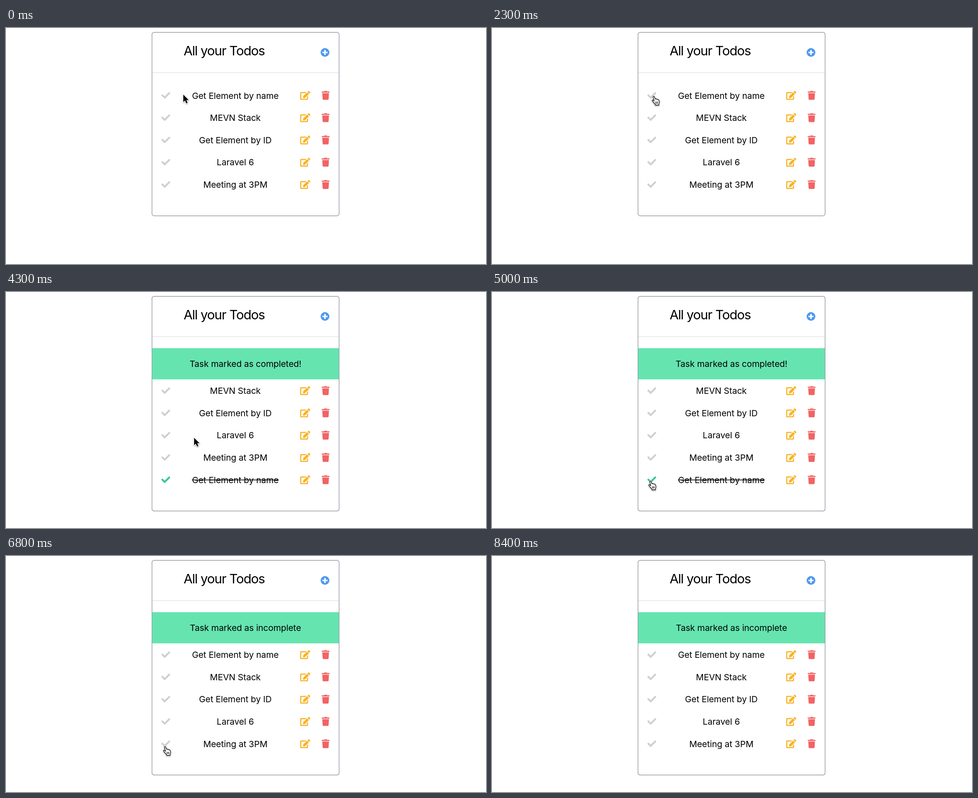
An HTML page with a canvas that plays this animation: 1064x526 px, repeating every 8.9 s.

```html
<!DOCTYPE html>
<html lang="en">
<head>
<meta charset="utf-8">
<title>Todo list</title>
<style>
html, body { margin: 0; width: 100%; height: 100%; overflow: hidden; background: #fff; }
canvas { display: block; }
</style>
</head>
<body>
<canvas id="stage" width="1064" height="526"></canvas>
<script>
const ctx = document.getElementById('stage').getContext('2d');
const LOOP = 8900, STEP = 100;
const FONT = 'Inter, "Open Sans", sans-serif';
const DONE_AT = 3500, UNDONE_AT = 6800;
const TASKS = ['Get Element by name', 'MEVN Stack', 'Get Element by ID', 'Laravel 6', 'Meeting at 3PM'];
const ICON = 19.84 / 512;
const COLORS = {
  blue: '#4f98f0', grey: '#cdcfd2', green: '#30c992', mint: '#66e4b0',
  yellow: '#f8b326', red: '#f26364', border: '#868c98', rule: '#dfe0e1'
};

// Icon shapes on a 512 unit high grid
const check = new Path2D('M174 439L7.5 273c-10-10-10-26 0-36l36-36c10-10 26-10 36 0L192 312.7 432 72.6c10-10 26-10 36 0l36 36c10 10 10 26 0 36L210 439c-10 10-26 10-36 0z');
const pencil = new Path2D('M402.6 83.2l90.2 90.2c3.8 3.8 3.8 10 0 13.8L274.4 405.6l-92.8 10.3c-12.4 1.4-22.9-9.1-21.5-21.5l10.3-92.8L388.8 83.2c3.8-3.8 10-3.8 13.8 0zM564.6 60.3l-48.8-48.8c-15.2-15.2-39.9-15.2-55.2 0l-35.4 35.4c-3.8 3.8-3.8 10 0 13.8l90.2 90.2c3.8 3.8 10 3.8 13.8 0l35.4-35.4c15.2-15.3 15.2-40 0-55.2z');
const sheet = new Path2D('M384 346V448H64V128h230c3 0 6-1 8.5-3.5l40-40c7.5-7.5 2-20.5-8.5-20.5H48C21.5 64 0 85.5 0 112v352c0 26.5 21.5 48 48 48h352c26.5 0 48-21.5 48-48V306c0-10.7-13-16-20.5-8.5l-40 40c-2 2.5-3.5 5.5-3.5 8.5z');
const trash = new Path2D('M432 32H312l-9-19A24 24 0 0 0 281 0H167a24 24 0 0 0-22 13L136 32H16A16 16 0 0 0 0 48v32a16 16 0 0 0 16 16h416a16 16 0 0 0 16-16V48a16 16 0 0 0-16-16zM53 467a48 48 0 0 0 48 45h246a48 48 0 0 0 48-45L416 128H32z');

// Cursors in pixels
const arrow = new Path2D('M0 0V16.6L3.8 13 6.6 19.5 9.5 18.3 6.8 12H12Z');
const hand = new Path2D('M3.2 3.4C2.5 1.3 5.3.3 6.1 2.3L7.8 7.3C8.3 6.4 10 6.5 10.4 7.8 11 7 12.6 7.3 13 8.6 14 7.9 15.6 8.5 15.9 9.8L16.9 13.4C17.3 16 16.2 17.2 15.8 18.6V21H8.2L7.8 19.4C6.6 17.3 4.2 15.4 2 12.4 1 11 .6 10.2 1.3 9.6 2.4 8.8 4.2 10.2 5.5 11.8Z');
const creases = new Path2D('M8.6 13.6L9 17.6M10.9 13.5L11.2 17.5M13.2 13.4L13.3 17.4');

// Pointer path: time, x, y, shape
const PATH = [
  [0, 393, 148.5, 'arrow'], [100, 388, 148, 'arrow'], [300, 368, 146, 'arrow'],
  [500, 355, 145, 'arrow'], [600, 353, 144.5, 'arrow'], [700, 353, 144.5, 'arrow'],
  [900, 352.5, 147, 'arrow'], [1500, 352.5, 147, 'arrow'],
  [1600, 355, 150.5, 'hand'], [1800, 357, 152, 'hand'], [1900, 357, 152, 'hand'],
  [2000, 355, 152, 'hand'], [2100, 355, 152, 'hand'], [2200, 352.8, 151.5, 'hand'],
  [2300, 354, 151, 'hand'], [3800, 354, 151, 'hand'],
  [3900, 362, 160, 'arrow'], [4100, 392, 215, 'arrow'], [4300, 417, 325, 'arrow'],
  [4500, 400, 426, 'arrow'], [4600, 378, 440, 'arrow'], [4700, 361, 430, 'arrow'],
  [4800, 350, 425, 'hand'], [5000, 346.5, 420, 'hand'], [5100, 346.5, 420, 'hand'],
  [5200, 355, 419, 'hand'], [5300, 382, 417, 'arrow'], [5500, 436, 416, 'arrow'],
  [5700, 385, 422, 'arrow'], [5800, 352, 424, 'hand'], [5900, 348, 423.5, 'hand'],
  [6800, 348, 423.5, 'hand'], [6900, 354, 416, 'arrow'], [7200, 379, 366, 'arrow'],
  [7600, 441, 252, 'arrow'], [7900, 560, 166, 'arrow'], [8300, 778, 31, 'arrow'],
  [8400, 0, 0, 'none']
];

function pointerAt(t) {
  let i = PATH.length - 1;
  while (PATH[i][0] > t) i--;
  const [t0, x0, y0, shape] = PATH[i];
  if (shape === 'none') return { shape };
  const [t1, x1, y1] = PATH[i + 1];
  const k = (t - t0) / (t1 - t0);
  return { shape, x: x0 + (x1 - x0) * k, y: y0 + (y1 - y0) * k };
}

function icon(path, x, cy, color) {
  ctx.save();
  ctx.translate(x, cy - 256 * ICON);
  ctx.scale(ICON, ICON);
  ctx.fillStyle = color;
  ctx.fill(path);
  ctx.restore();
}

function label(text, cx, base, size = 19.3, spacing = -0.1) {
  ctx.font = `400 ${size}px ${FONT}`;
  ctx.letterSpacing = spacing + 'px';
  ctx.textAlign = 'center';
  ctx.fillStyle = '#000';
  ctx.fillText(text, cx, base);
  return ctx.measureText(text).width;
}

function plusButton(x, y) {
  ctx.fillStyle = COLORS.blue;
  ctx.beginPath();
  ctx.arc(x, y, 9.7, 0, Math.PI * 2);
  ctx.fill();
  ctx.fillStyle = '#fff';
  ctx.fillRect(x - 5.6, y - 1.6, 11.2, 3.2);
  ctx.fillRect(x - 1.6, y - 5.6, 3.2, 11.2);
}

function taskRow(text, cy, done) {
  icon(check, 344.3, cy, done ? COLORS.green : COLORS.grey);
  const w = label(text, 508.3, cy + 7.3);
  if (done) ctx.fillRect(508.3 - w / 2, cy - 0.3, w, 1.5);
  icon(sheet, 652.1, cy, COLORS.yellow);
  icon(pencil, 652.1, cy, COLORS.yellow);
  icon(trash, 699.8, cy, COLORS.red);
}

function card(bottom) {
  ctx.strokeStyle = COLORS.border;
  ctx.lineWidth = 1.2;
  ctx.beginPath();
  ctx.roundRect(323.6, 9.6, 414.8, bottom - 9.6, 4.8);
  ctx.stroke();
  ctx.fillStyle = COLORS.rule;
  ctx.fillRect(324.2, 99, 413.6, 1.3);
}

function pointer({ shape, x, y }) {
  if (shape === 'none') return;
  const isArrow = shape === 'arrow', path = isArrow ? arrow : hand;
  ctx.save();
  ctx.translate(x, y);
  ctx.lineJoin = ctx.lineCap = 'round';
  ctx.shadowColor = 'rgba(0,0,0,.35)';
  ctx.shadowBlur = 3;
  ctx.shadowOffsetY = 1.2;
  ctx.strokeStyle = '#fff';
  ctx.lineWidth = isArrow ? 2.2 : 2.6;
  ctx.stroke(path);
  ctx.shadowColor = 'transparent';
  ctx.fillStyle = isArrow ? '#000' : '#fff';
  ctx.fill(path);
  if (!isArrow) {
    ctx.strokeStyle = '#000';
    ctx.lineWidth = 1.3;
    ctx.stroke(path);
    ctx.lineWidth = 1;
    ctx.stroke(creases);
  }
  ctx.restore();
}

function draw(t) {
  const notice = t >= DONE_AT, done = notice && t < UNDONE_AT;
  const tasks = done ? [...TASKS.slice(1), TASKS[0]] : TASKS;
  ctx.fillStyle = '#fff';
  ctx.fillRect(0, 0, 1064, 526);
  card(notice ? 488.2 : 418.6);
  label('All your Todos', 483.5, 61, 28.9, -1.1);
  plusButton(707.1, 54.5);
  if (notice) {
    ctx.fillStyle = COLORS.mint;
    ctx.fillRect(324, 125.2, 414, 69.5);
    label(done ? 'Task marked as completed!' : 'Task marked as incomplete', 530.8, 167.4);
  }
  const top = notice ? 219.8 : 150.2;
  tasks.forEach((text, i) => taskRow(text, top + i * 49.65, done && i === 4));
  pointer(pointerAt(t));
}

function tick() {
  const t = performance.now() % LOOP;
  draw(Math.floor(t / STEP) * STEP);
  requestAnimationFrame(tick);
}
tick();
</script>
</body>
</html>
```
